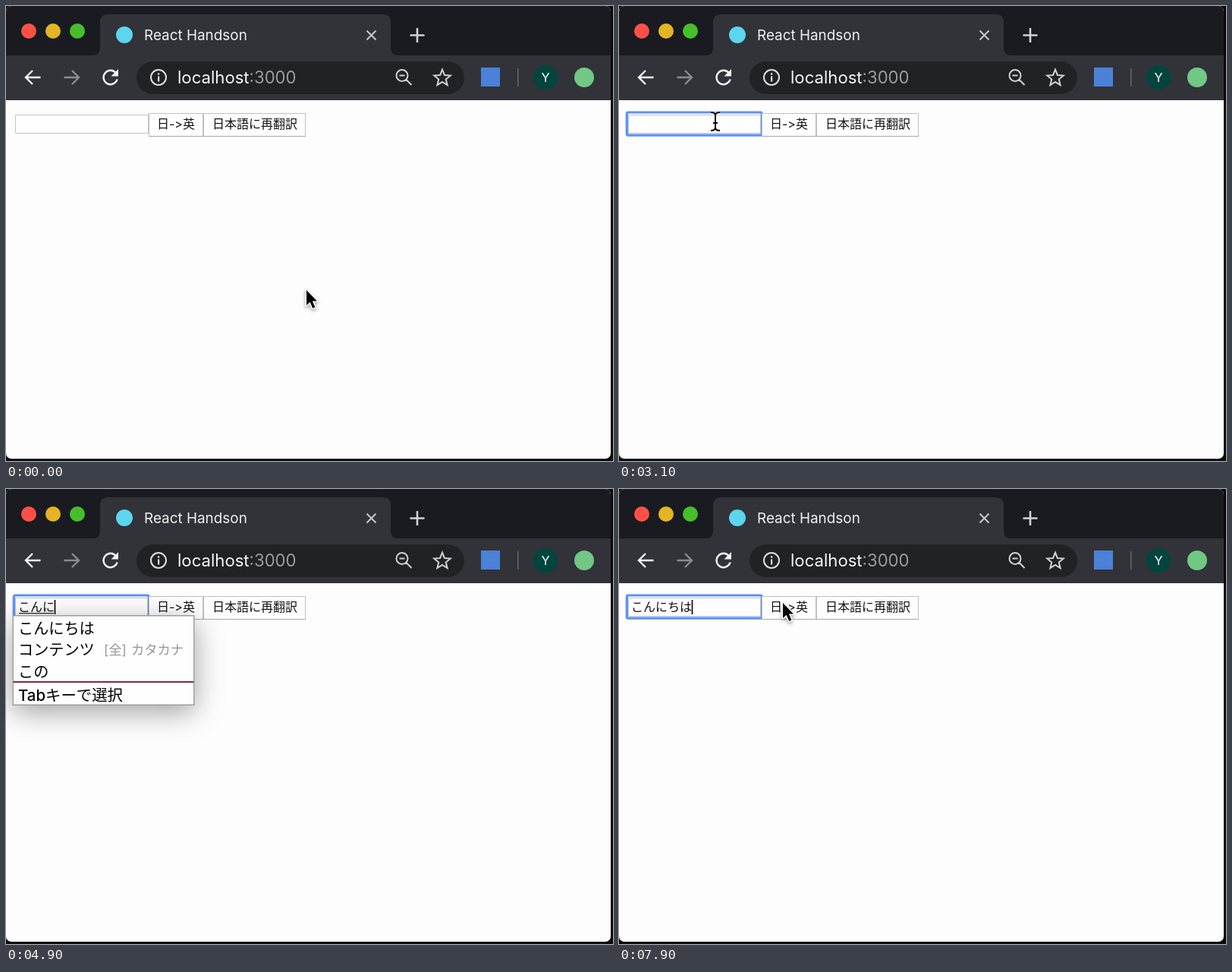
Write an HTML page with a canvas that moves like this. It is 800x599 px and loops after 8000 ms.

```html
<!DOCTYPE html>
<html lang="ja">
<head>
<meta charset="utf-8">
<title>React Handson</title>
<style>
html, body { margin: 0; width: 100%; height: 100%; overflow: hidden; background: #0a0a0c; }
canvas { display: block; }
</style>
</head>
<body>
<canvas id="stage" width="800" height="599"></canvas>
<script>
const ctx = document.getElementById('stage').getContext('2d');
const LOOP = 8000;
const SANS = 'Inter, "Noto Sans CJK JP", "Noto Sans CJK", sans-serif';
const PAGE = '#fdfdfd', INK = '#111111', PALE = '#f4f4f4', BAR = '#313338', ICON = '#d2d2d4';

// Composition text by start time
const TYPED = [
  [3850, 'ｋ'], [4050, 'こ'], [4300, 'こｎ'], [4550, 'こん'], [4700, 'こんｎ'], [4850, 'こんに'],
  [5000, 'こんにｃ'], [5150, 'こんにち'], [5250, 'こんにちｈ'], [5350, 'こんにちは']
];
const FOCUS = 2300, COMMIT = 5800;
const MENUS = [
  { from: 4100, width: 240, rows: ['こんにちは', 'コンテンツ', 'この'], notes: [['[全]', 129, 1], ['カタカナ', 165, 1]] },
  { from: 5350, width: 267, rows: ['こんにちはを', 'こんにちはを指定', 'こんにちは'], notes: [['ひらがな', 192, 2]] }
];
// Pointer path: time, x, y
const PATH = [[0, 396, 374], [500, 396, 374], [1500, 127, 152], [6500, 127, 152], [6800, 191, 152], [7150, 216, 150]];

const latest = (list, t, at) => list.filter(item => at(item) <= t).pop();

// Returns the x where the text ends
function text(str, x, y, size, color, weight = 400) {
  ctx.font = `${weight} ${size}px ${SANS}`;
  ctx.fillStyle = color;
  ctx.fillText(str, x, y);
  return x + ctx.measureText(str).width;
}
function rect(x, y, w, h, color) {
  ctx.fillStyle = color;
  ctx.fillRect(x, y, w, h);
}
function round(x, y, w, h, r, color) {
  ctx.beginPath();
  ctx.roundRect(x, y, w, h, r);
  ctx.fillStyle = color;
  ctx.fill();
}
function frame(x, y, w, h, color, line = 1) {
  ctx.strokeStyle = color;
  ctx.lineWidth = line;
  ctx.strokeRect(x + line / 2, y + line / 2, w - line, h - line);
}
function disc(x, y, r, color) {
  ctx.beginPath();
  ctx.arc(x, y, r, 0, Math.PI * 2);
  ctx.fillStyle = color;
  ctx.fill();
}
function stroke(d, color, line) {
  ctx.strokeStyle = color;
  ctx.lineWidth = line;
  ctx.stroke(new Path2D(d));
}

function star(x, y, r) {
  ctx.beginPath();
  for (let i = 0; i < 10; i++) {
    const a = -Math.PI / 2 + i * Math.PI / 5, d = i % 2 ? r * 0.44 : r;
    ctx.lineTo(x + d * Math.cos(a), y + d * Math.sin(a));
  }
  ctx.closePath();
  ctx.strokeStyle = ICON;
  ctx.lineWidth = 2;
  ctx.stroke();
}

function chrome() {
  rect(0, 0, 800, 599, '#0a0a0c');
  round(0, 0, 797, 596, 7, PAGE);
  round(0, 0, 797, 124, [7, 7, 0, 0], '#191b20');
  rect(0, 65, 797, 59, BAR);
  ctx.fillStyle = BAR;
  ctx.fill(new Path2D('M114 65Q124 65 124 55V21Q124 11 134 11H497Q507 11 507 21V55Q507 65 517 65Z'));
  disc(30, 33, 10, '#ff5048');
  disc(62, 33, 10, '#e4b424');
  disc(94, 33, 10, '#48be2c');

  disc(156, 38, 11, '#5cd5ee');
  text('React Handson', 182, 45, 18.9, '#f0f0f0');
  stroke('M475.500 32.500L487.500 44.500M487.500 32.500L475.500 44.500', '#c8c8ca', 2);
  stroke('M532.500 38.500H551.500M542 29V48', ICON, 2.6);

  stroke('M45.500 94H26M35 85L26 94L35 103', PALE, 2.4);
  stroke('M76.500 94H96M87 85L96 94L87 103', '#8c8c8e', 2.4);
  stroke('M145.200 88.600A9.200 9.200 0 1 0 146.600 96.500', PALE, 2.4);
  ctx.fillStyle = PALE;
  ctx.fill(new Path2D('M148 83V92.500H138.500Z'));

  round(172, 73, 432, 43, 21.5, '#202226');
  stroke('M211 94A10 10 0 1 1 191 94A10 10 0 1 1 211 94', '#e0e0e2', 2);
  rect(200, 92.5, 2.2, 7, '#e0e0e2');
  rect(200, 88.3, 2.2, 2.4, '#e0e0e2');
  const hostEnd = text('localhost', 226, 102, 22.15, '#f8f8f8');
  text(':3000', hostEnd, 102, 22.15, '#9c9c9f');
  stroke('M529.500 91.500A7.500 7.500 0 1 1 514.500 91.500A7.500 7.500 0 1 1 529.500 91.500M527.500 97L534.500 104M518.500 91.500H525.500', ICON, 2);
  star(575, 95, 11.3);

  rect(626, 81, 25, 25, '#4b82d8');
  rect(674, 82, 1.5, 24, '#66686c');
  disc(711, 94, 16, '#00463e');
  ctx.textAlign = 'center';
  text('Y', 711, 100, 16.5, '#ffffff');
  ctx.textAlign = 'left';
  disc(762, 94, 13, '#70c884');
}

// Label parts are drawn apart so that "->" does not become an arrow
function button(x, w, pad, ...parts) {
  rect(x, 141, w, 31, '#fefefe');
  frame(x, 141, w, 31, '#c0c0c6');
  rect(x, 171, w, 1, '#a8a8ae');
  parts.reduce((at, part) => text(part, at, 161, 16, INK), x + pad);
}

function form(focused) {
  rect(12, 143, 176, 25, '#fefefe');
  frame(12, 143, 176, 25, '#c4c4c8');
  if (focused) {
    ctx.beginPath();
    ctx.roundRect(10.3, 140, 178, 30.2, 2);
    ctx.lineWidth = 3.2;
    ctx.strokeStyle = '#5b93f2';
    ctx.stroke();
    frame(12, 143, 175, 25, '#c4c6cc');
  }
  button(188, 72, 11, '日-', '>英');
  button(260, 135, 12, '日本語に再翻訳');
}

function entry(t) {
  if (t < FOCUS) return;
  const typed = latest(TYPED, t, item => item[0]);
  const str = typed ? typed[1] : '';
  const end = 16 + str.length * 16;
  text(str, 16, 161, 16, INK);
  const composing = str && t < COMMIT;
  if (composing) rect(17, 163, end - 18, 1.3, '#303030');
  const phase = t < COMMIT ? t - FOCUS : t - COMMIT;
  if (composing || phase % 1000 < 500) rect(end - 0.3, 146, 1.6, 19, '#000000');
}

function menu(t) {
  const m = t < COMMIT && latest(MENUS, t, item => item.from);
  if (!m) return;
  ctx.save();
  ctx.beginPath();
  ctx.rect(0, 124, 797, 472);
  ctx.clip();
  ctx.shadowColor = 'rgba(0, 0, 0, 0.36)';
  ctx.shadowBlur = 34;
  ctx.shadowOffsetY = 9;
  rect(8.5, 166, m.width, 119, '#fefefe');
  ctx.restore();
  frame(8.5, 166, m.width, 119, '#9c9c9a', 1.5);
  m.rows.forEach((row, i) => text(row, 16, 190.5 + i * 28.5, 20.15, '#000000', 500));
  m.notes.forEach(([str, x, i]) => text(str, x, 189 + i * 28.5, 17.3, '#969696'));
  rect(9.5, 253, m.width - 2, 2, '#7a3038');
  text('Tabキーで選択', 16, 279, 20.4, '#000000', 500);
}

function place(t) {
  const i = PATH.findIndex(p => p[0] > t);
  if (i < 0) return PATH[PATH.length - 1].slice(1);
  const [t0, x0, y0] = PATH[i - 1], [t1, x1, y1] = PATH[i];
  const k = (t - t0) / (t1 - t0);
  const e = i === 2 ? k * k * (3 - 2 * k) : k;
  return [x0 + (x1 - x0) * e, y0 + (y1 - y0) * e];
}

const ARROW = new Path2D('M0 0V20L4.600 15.800L8.200 24L11.400 22.600L7.900 14.500H14Z');
const BEAM = new Path2D('M-6 -12Q0 -12 0 -8Q0 -12 6 -12M0 -9V9M-6 12Q0 12 0 8Q0 12 6 12M-3 2H3');

function pointer(t) {
  if (t >= TYPED[0][0] && t < 6500) return;
  const [x, y] = place(t);
  const overField = x > 12 && x < 193 && y > 142 && y < 168;
  ctx.save();
  ctx.translate(x, y);
  ctx.lineJoin = 'round';
  ctx.strokeStyle = '#ffffff';
  if (overField) {
    ctx.lineWidth = 4;
    ctx.stroke(BEAM);
    ctx.strokeStyle = '#000000';
    ctx.lineWidth = 2;
    ctx.stroke(BEAM);
  } else {
    ctx.shadowColor = 'rgba(0, 0, 0, 0.4)';
    ctx.shadowBlur = 4;
    ctx.shadowOffsetY = 2;
    ctx.lineWidth = 3;
    ctx.stroke(ARROW);
    ctx.shadowColor = 'transparent';
    ctx.fillStyle = '#000000';
    ctx.fill(ARROW);
  }
  ctx.restore();
}

function draw() {
  const t = performance.now() % LOOP;
  chrome();
  form(t >= FOCUS);
  entry(t);
  menu(t);
  pointer(t);
  requestAnimationFrame(draw);
}
draw();
</script>
</body>
</html>
```
